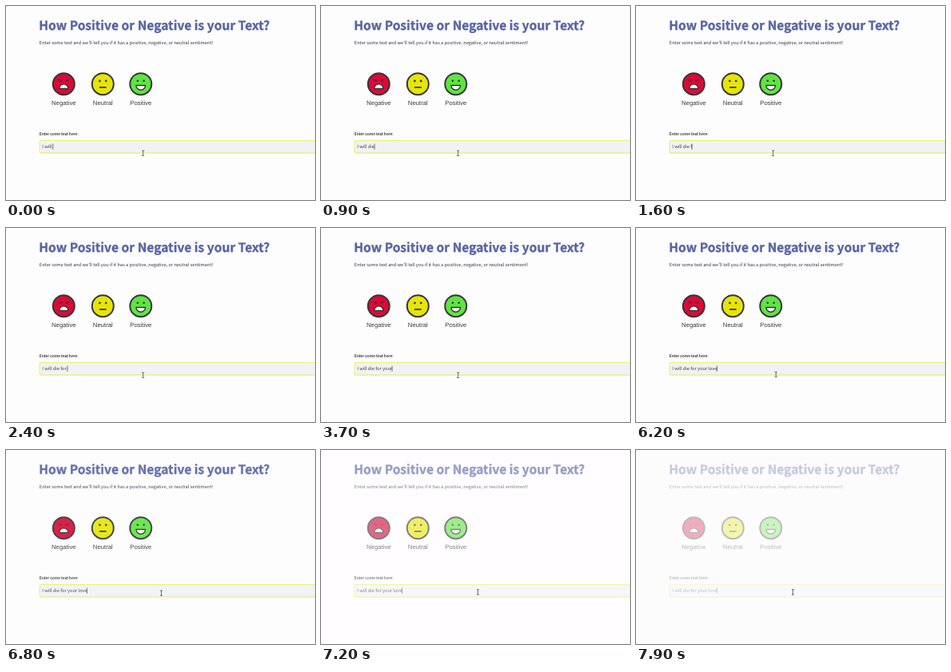
An HTML page with a canvas that plays this animation: 387 by 243 pixels, repeating every 8000 ms.

```html
<!DOCTYPE html>
<html lang="en">
<head>
<meta charset="utf-8">
<title>Text sentiment</title>
<style>
html, body { margin: 0; width: 100%; height: 100%; overflow: hidden; background: #fefdfe; }
canvas { display: block; width: 387px; height: 243px; }
</style>
</head>
<body>
<canvas id="stage"></canvas>
<script>
const W = 387, H = 243, LOOP = 8000;
const SANS = '"Noto Sans CJK JP", "Noto Sans CJK SC", "Noto Sans CJK", "Noto Sans", sans-serif';
const ARIAL = '"Liberation Sans", Arial, sans-serif';
const INK = '#35353b';
const TITLE = '#5865a3';
const MESSAGE = 'I will die for your love';
const START = 7;
// moment at which each further letter appears
const KEYS = [300, 600, 800, 1000, 1600, 1900, 2100, 2300, 2600, 2900, 3200, 3500, 3900, 4200, 4300, 4600, 4700];

const canvas = document.getElementById('stage');
const ctx = canvas.getContext('2d');
const dpr = window.devicePixelRatio || 1;
canvas.width = Math.round(W * dpr);
canvas.height = Math.round(H * dpr);

const clamp = v => Math.max(0, Math.min(1, v));
const mix = (a, b, k) => a + (b - a) * k;

// cubic-bezier(.42, 0, 1, 1)
function easeIn(x) {
  let lo = 0, hi = 1;
  for (let i = 0; i < 20; i++) {
    const u = (lo + hi) / 2, v = 1 - u;
    if (3 * v * v * u * 0.42 + 3 * v * u * u + u * u * u < x) lo = u; else hi = u;
  }
  return 3 * (1 - lo) * lo * lo + lo * lo * lo;
}

// weight thickens the letters with an outline of that width
function text(str, x, y, font, color, { align = 'left', weight = 0 } = {}) {
  ctx.font = font;
  ctx.fillStyle = ctx.strokeStyle = color;
  ctx.textAlign = align;
  ctx.fillText(str, x, y);
  if (weight) {
    ctx.lineWidth = weight;
    ctx.strokeText(str, x, y);
  }
}

function line(color, width, ...pts) {
  ctx.strokeStyle = color;
  ctx.lineWidth = width;
  ctx.beginPath();
  for (let i = 0; i < pts.length; i += 2) ctx.lineTo(pts[i], pts[i + 1]);
  ctx.stroke();
}

function dot(x, y, r) {
  ctx.fillStyle = INK;
  ctx.beginPath();
  ctx.arc(x, y, r, 0, Math.PI * 2);
  ctx.fill();
}

function face(x, color, label, features) {
  ctx.save();
  ctx.translate(x, 97.7);
  ctx.lineCap = 'round';
  ctx.lineJoin = 'round';
  ctx.beginPath();
  ctx.arc(0, 0, 13.5, 0, Math.PI * 2);
  ctx.fillStyle = color;
  ctx.fill();
  ctx.strokeStyle = INK;
  ctx.lineWidth = 2;
  ctx.stroke();
  features();
  ctx.restore();
  text(label, x, 124.3, '7.75px ' + ARIAL, '#37373c', { align: 'center' });
}

function halfMouth(y, r, up) {
  ctx.beginPath();
  ctx.arc(0, y, r, 0, Math.PI, up);
  ctx.closePath();
  ctx.fillStyle = '#fff';
  ctx.fill();
  ctx.strokeStyle = INK;
  ctx.lineWidth = 1.4;
  ctx.stroke();
}

function negative() {
  for (const s of [-1, 1]) {
    line(INK, 1, s * 6.6, -5.4, s * 2.2, -4.6);
    line(INK, 0.9, s * 5.8, -3.6, s * 2.8, -3.2);
  }
  halfMouth(5.8, 5.6, true);
}

function neutral() {
  dot(-3.9, -3.8, 1.3);
  dot(3.9, -3.8, 1.3);
  line(INK, 1.8, -3.6, 4.2, 3.6, 4.2);
}

function positive() {
  dot(-3.9, -4, 1.3);
  dot(3.9, -4, 1.3);
  halfMouth(1.8, 5.8, false);
}

function caretOn(t) {
  return t < 5200 || t >= 7800 || Math.floor((t - 5200) / 520) % 2 === 1;
}

function page(t) {
  text('How Positive or Negative is your Text?', 41.2, 30.2, 'bold 15.6px ' + SANS, TITLE, { weight: 0.35 });
  text('Enter some text and we’ll tell you if it has a positive, negative, or neutral sentiment!',
    41.8, 48.4, '5.66px ' + SANS, '#33343f');

  face(72.3, '#db0a35', 'Negative', negative);
  face(121.3, '#e6e507', 'Neutral', neutral);
  face(168.8, '#5fe53f', 'Positive', positive);

  text('Enter some text here:', 41.8, 161.8, '4.96px ' + SANS, '#25262f', { weight: 0.12 });

  ctx.beginPath();
  ctx.roundRect(42.1, 168.5, 360, 15.6, 2);
  ctx.fillStyle = '#f1f2f5';
  ctx.fill();
  ctx.strokeStyle = '#ebee6c';
  ctx.lineWidth = 1.1;
  ctx.stroke();

  const shown = MESSAGE.slice(0, START + KEYS.filter(k => t >= k).length);
  text(shown, 45.2, 178.2, '5.7px ' + SANS, '#3c3d47');
  if (caretOn(t)) {
    const x = 45.2 + ctx.measureText(shown).width;
    line('#4a4b52', 0.8, x, 172.6, x, 179.8);
  }
}

function pointer(t) {
  const a = clamp((t - 6000) / 800), b = clamp((t - 6800) / 300);
  const k = a * a * (3 - 2 * a);
  const x = mix(171.7, 194.5, k) + 2 * b;
  const y = mix(184.3, 179.2, k) - 1.2 * b;
  line('#4a4a4e', 0.8, x, y - 3.2, x, y + 3.2);
  for (const s of [-3.2, 3.2]) line('#4a4a4e', 0.7, x - 1.6, y + s, x + 1.6, y + s);
}

function draw(t) {
  ctx.setTransform(dpr, 0, 0, dpr, 0, 0);
  ctx.textRendering = 'geometricPrecision';
  ctx.globalAlpha = 1;
  ctx.fillStyle = '#fefdfe';
  ctx.fillRect(0, 0, W, H);
  page(t);
  // veil the whole page evenly, below the pointer
  ctx.globalAlpha = 0.67 * easeIn(clamp((t - 6500) / 1000));
  ctx.fillStyle = '#fefdfe';
  ctx.fillRect(0, 0, W, H);
  ctx.globalAlpha = 1;
  pointer(t);
}

const begin = performance.now();
function tick() {
  draw((performance.now() - begin) % LOOP);
  requestAnimationFrame(tick);
}
tick();
</script>
</body>
</html>
```
